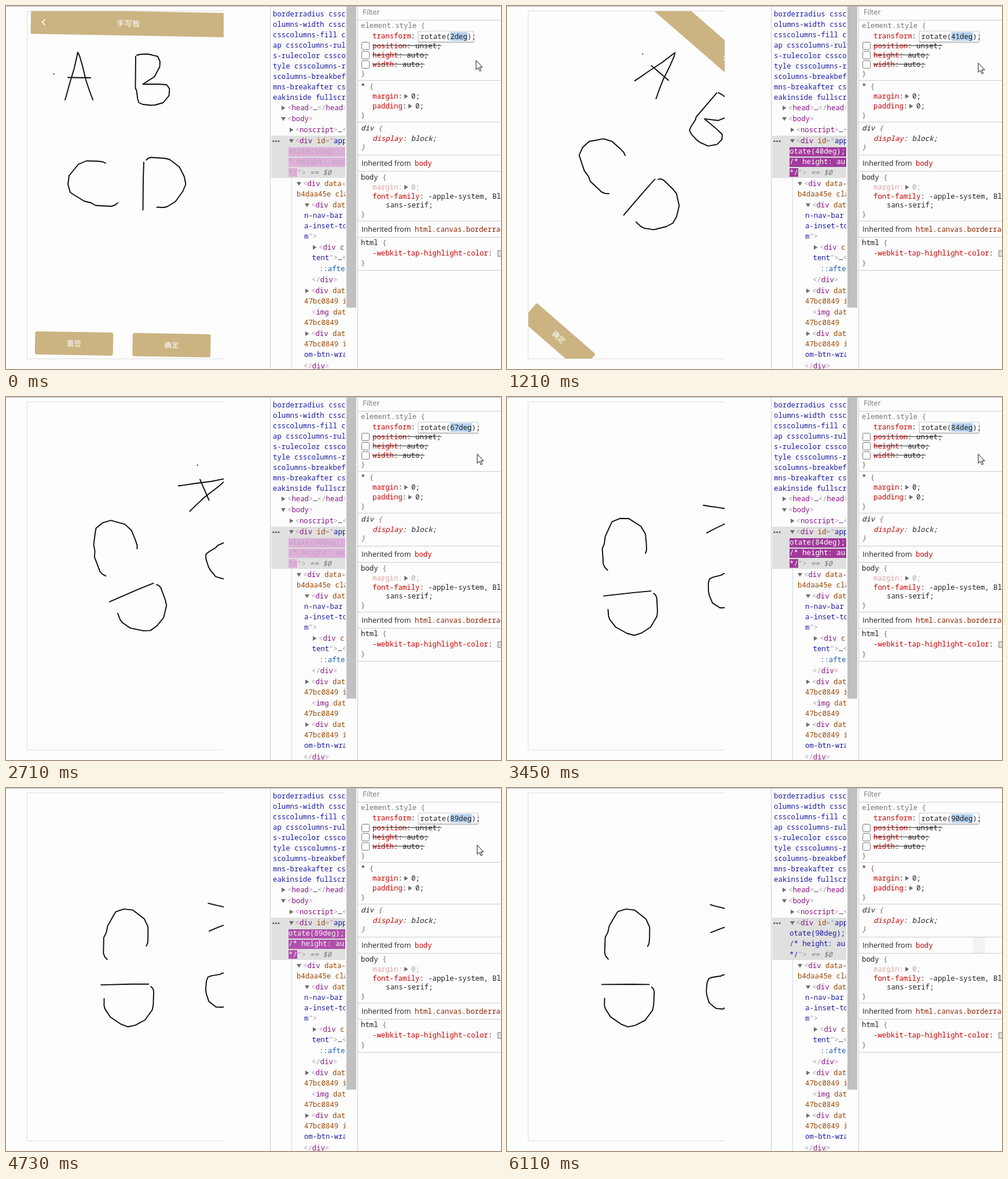
These frames come from a looping animation (855 by 627 pixels, 6210 ms). An HTML page:

```html
<!DOCTYPE html>
<html lang="zh-CN">
<head>
<meta charset="utf-8">
<title>Rotate</title>
<style>
html, body { margin: 0; width: 855px; height: 627px; overflow: hidden; background: #fdfdfd; }
svg { display: block; }
text { font: 12.33px "Noto Sans Mono", monospace; white-space: pre; }
.ui { font: 12.6px "Open Sans", sans-serif; }
.zh { font: 12.6px "Noto Sans CJK SC", "Noto Sans CJK", sans-serif; text-anchor: middle; fill: #fff; }
.it { font-style: italic; }
.k { fill: #a894a6; } .t { fill: #881280; } .a { fill: #994500; } .v { fill: #1a1aa6; }
.p { fill: #c80000; } .b { fill: #222; } .g { fill: #777; } .x { fill: #1a5fb4; }
.r { fill: #8b2500; } .c { fill: #8a6a55; } .f { fill: #e3a0a0; } .l { fill: #aaa; }
</style>
</head>
<body>
<svg id="stage" width="855" height="627" viewBox="0 0 855 627">
  <defs>
    <clipPath id="pageClip"><rect x="37" y="9" width="339" height="600"/></clipPath>
    <clipPath id="treeClip"><rect x="457" y="1" width="129" height="626"/></clipPath>
    <filter id="shadow" x="-10%" y="-30%" width="120%" height="180%">
      <feDropShadow dx="0" dy="1" stdDeviation="1.2" flood-opacity=".35"/>
    </filter>
  </defs>
  <path d="M376 8.5H36.5V609.5H376" fill="none" stroke="#dedede"/>
  <g clip-path="url(#pageClip)">
    <g id="app">
      <g fill="#cbb382">
        <rect x="38" y="9" width="337" height="42"/>
        <rect x="54.9" y="564.5" width="134.8" height="40" rx="3.5"/>
        <rect x="223.4" y="564.5" width="134.8" height="40" rx="3.5"/>
      </g>
      <path d="M62.6 25.5l-5 5 5 5" fill="none" stroke="#fff" stroke-width="1.7"/>
      <text class="zh" x="206.5" y="35" style="font-size:13.5px">手写板</text>
      <text class="zh" x="122.3" y="589">重签</text>
      <text class="zh" x="290.8" y="589">确定</text>
      <g transform="rotate(-1 206.5 308.6)" fill="none" stroke="#0a0a0a" stroke-width="1.9" stroke-linecap="round" stroke-linejoin="round">
        <path d="M82.5 117.5h.2"/>
        <path d="M102 162l3-10 4-15 9-30 4-18 2-9 3 6 5 17 6 25 6 18 6 16M107 123.5l39 .5"/>
        <path d="M224 87l-.5 55 2 4 2 15 2 6 7 3 14 1.500 7-.5 14-4 10-12 1-12-5-7-13-1h-28l20-13 9-17 .5-9-4-9-17-4-13 .5-6 1.500"/>
        <path d="M172 271.500l-5-2.500-10-1-18-.5-14 6-16 19.500-2 15 4 14 6 4 18 11 12 3 8 4.500 27 1.500 6-2 5-4"/>
        <path d="M238 270l-1 30-.5 52M242.500 266l3-3 5-1.500 23 1.500 9 2 17 13 8.500 17 2.500 13-5 12-13 18-14 8.500-6 1.500-12-.5"/>
      </g>
    </g>
  </g>
  <path d="M0 .5H855" stroke="#b8b8b8"/>
  <path d="M456.500 1V627M607.500 1V627" stroke="#cbcbcb"/>
  <rect x="588" y="1" width="17" height="520" fill="#c1c1c1"/>
  <g id="tree" clip-path="url(#treeClip)">
    <rect x="458" y="224" width="128" height="73" fill="#e0e0e0"/>
    <path d="M493.500 297V627" stroke="#d0d7ea"/>
    <g id="marks">
      <rect x="488" y="244" width="98" height="16"/>
      <rect x="488" y="262" width="98" height="16"/>
      <rect x="488" y="280" width="15" height="15"/>
    </g>
    <g fill="#555"><circle cx="462" cy="233.500" r="1.500"/><circle cx="466.500" cy="233.500" r="1.500"/><circle cx="471" cy="233.500" r="1.500"/></g>
  </g>
  <g id="styles">
    <path id="rules" fill="none" stroke="#cccccc"/>
    <rect id="patch" x="805" y="258" width="20" height="27" fill="#f2f2f2"/>
  </g>
  <g id="edit">
    <rect id="field" x="712.500" y="43.500" height="18" fill="#fff" stroke="#d4d4d4" filter="url(#shadow)"/>
    <rect id="pick" x="767.500" y="45" height="15" fill="#b3d2f0"/>
    <text id="value" class="b" x="715.500" y="56.500"></text>
  </g>
  <path id="cursor" d="M0 0V16l3.700-3.500 2.600 6 2.300-1-2.600-5.700h5z" fill="#fff" stroke="#111" stroke-linejoin="round"/>
</svg>
<script>
const LOOP = 6210;
const $ = id => document.getElementById(id);

function add(parent, name, attrs) {
  const el = document.createElementNS("http://www.w3.org/2000/svg", name);
  for (const key in attrs) el.setAttribute(key, attrs[key]);
  parent.append(el);
  return el;
}

// "~tdiv~adata" gives spans "div" and "data" with classes t and a
function line(parent, x, y, spec, cls = "") {
  const el = add(parent, "text", { x, y: y + 4.3, class: cls });
  for (const part of spec.split("~").slice(1))
    add(el, "tspan", { class: part[0] }).textContent = part.slice(1);
  return el;
}

function arrow(parent, x, y, open) {
  const d = open ? "m-4-3h8l-4 6.500z" : "m-3-4v8l6.500-4z";
  add(parent, "path", { d: `M${x} ${y}${d}`, fill: "#6e6e6e" });
}

const tree = $("tree"), styles = $("styles");

["borderradius cssc", "olumns-width cssc", "csscolumns-fill c", "ap csscolumns-rul",
 "s-rulecolor cssco", "tyle csscolumns-r", "scolumns-breakbef", "mns-breakafter cs", "eakinside fullscr"]
  .forEach((s, i) => line(tree, 461, 13.5 + i * 18, "~v" + s));

[[486, 176, "~k<~thead~k>~b…~k</~thead~k>"],
 [486, 195, "~k<~tbody~k>"],
 [499.5, 214, "~k<~tnoscript~k>~b…~k</"],
 [499.5, 233, "~k<~tdiv ~aid~k=\"~vapp"],
 [513, 307, "~k<~tdiv ~adata-"],
 [502, 325, "~ab4daa45e cla"],
 [527, 344, "~k<~tdiv ~adata"],
 [515, 362, "~vn-nav-bar v"],
 [515, 380, "~va-inset-top"],
 [515, 398, "~vm~k\">"],
 [540, 417, "~k<~tdiv ~ac"],
 [528.5, 435, "~vtent~k\">~b…~k</"],
 [541, 454, "~x::after"],
 [528, 473, "~k</~tdiv~k>"],
 [527, 492, "~k<~tdiv ~adata"],
 [515, 510, "~a47bc0849 id"],
 [528, 529, "~k<~timg ~adata"],
 [515, 547, "~a47bc0849 "],
 [527, 566, "~k<~tdiv ~adata"],
 [515, 584, "~a47bc0849 id"],
 [515, 602, "~vom-btn-wrap"],
 [514, 622, "~k</~tdiv~k>"]].forEach(row => line(tree, ...row));

[[479, 176], [479, 195, 1], [493, 214], [493, 233, 1], [506, 307, 1], [520, 344, 1],
 [533, 417], [520, 492], [520, 566]].forEach(a => arrow(tree, ...a));

const attr = [251, 269, 287.5].map(y => line(tree, 488, y, "~v*/").firstChild);
line(tree, 503, 287.5, "~k\">");
line(tree, 525, 287.5, "~g== $0", "it");

$("rules").setAttribute("d", [24, 128, 200, 257, 285, 371, 399, 456].map(y => `M608 ${y}.5H855`).join(""));

[[616, 10.5, "~gFilter", "ui"],
 [613, 34, "~gelement.style {"],
 [633, 52, "~ptransform~b:"],
 [633, 69, "~pposition~b: unset;"],
 [633, 85, "~pheight~b: auto;"],
 [633, 101, "~pwidth~b: auto;"],
 [613, 117, "~c}"],
 [613, 139, "~b* ~c{"],
 [633, 156, "~pmargin~b:"], [700, 156, "~b0;"],
 [633, 173, "~ppadding~b:"], [707, 173, "~b0;"],
 [613, 189, "~c}"],
 [613, 211, "~bdiv ~c{", "it"],
 [633, 229, "~pdisplay~b: block;", "it"],
 [613, 244, "~c}", "it"],
 [614, 271.5, "~bInherited from", "ui"], [706, 272, "~pbody"],
 [613, 296, "~bbody ~c{"],
 [633, 313, "~fmargin~l:"], [700, 313, "~l0;"],
 [633, 329, "~pfont-family~b: -apple-system, Bl"],
 [656, 344, "~bsans-serif;"],
 [613, 360, "~c}"],
 [614, 385.5, "~bInherited from", "ui"], [706, 386, "~rhtml.canvas.borderrad"],
 [613, 409, "~bhtml ~c{"],
 [633, 427, "~p-webkit-tap-highlight-color~b:"],
 [613, 444, "~c}"]].forEach(row => line(styles, ...row));

[[691, 156], [698, 173], [691, 313]].forEach(a => arrow(styles, ...a));
[[69, 752], [85, 730], [101, 723]].forEach(([y, end]) => {
  add(styles, "rect", { x: 614.5, y: y - 6.5, width: 13, height: 13, rx: 2, fill: "#fff", stroke: "#767676" });
  add(styles, "path", { d: `M633 ${y - .5}H${end}`, stroke: "#333" });
});
add(styles, "rect", { x: 849.5, y: 422.5, width: 10, height: 10, fill: "#ddd", stroke: "#888" });

// time, drawn angle, angle in the tree
const steps = [
  [0, 1, 1], [150, 3, 2], [270, 7, 6], [390, 12, 11], [540, 18, 17], [690, 24, 23], [810, 28, 27],
  [930, 32, 31], [1080, 37, 36], [1200, 41, 40], [1320, 45, 44], [1440, 50, 49], [1570, 55, 55],
  [1690, 57, 55], [1810, 60, 59], [1930, 64, 63], [2080, 65, 65], [2200, 66, 66], [2590, 67, 66],
  [2830, 71, 70], [2950, 76, 75], [3070, 80, 79], [3210, 82, 82], [3330, 83, 83], [3450, 84, 84],
  [3840, 85, 84], [3960, 85, 85], [4110, 86, 85], [4230, 87, 87], [4490, 88, 88], [4610, 89, 89],
  [4850, 90, 90]
];
const moves = [[0, 812, 94], [150, 814, 98.5], [5270, 794, 179], [5420, 789, 583], [5590, 789, 640]];

// age of a tree update, mark colour, text colour
const fade = [
  [0, [160, 58, 155], [255, 255, 255]],
  [130, [176, 82, 172], [252, 240, 252]],
  [510, [221, 176, 217], [194, 160, 194]],
  [1260, [224, 224, 224], [26, 26, 166]]
];

const lastIndex = (list, t) => list.findLastIndex(s => s[0] <= t);

function fadeAt(age, column) {
  const i = Math.min(lastIndex(fade, age), fade.length - 2);
  const [a, b] = [fade[i], fade[i + 1]];
  const p = Math.min(1, (age - a[0]) / (b[0] - a[0]));
  return `rgb(${a[column].map((v, n) => Math.round(v + (b[column][n] - v) * p))})`;
}

function draw(t) {
  const i = lastIndex(steps, t);
  const [, angle, shown] = steps[i];
  const since = steps.find(s => s[2] === shown)[0];
  const age = shown === 1 ? t + 510 : t - since;

  $("app").setAttribute("transform", `rotate(${angle} 206.5 308.6)`);

  const typed = `${i ? angle : 2}deg`;
  $("value").textContent = `rotate(${typed});`;
  $("pick").setAttribute("width", typed.length * 7.4);
  $("field").setAttribute("width", 65.5 + typed.length * 7.4);

  const short = shown < 10;
  attr[0].textContent = `otate(${shown}deg);` + (short ? "/" : "");
  attr[1].textContent = short ? "* height: aut" : "/* height: au";
  $("marks").setAttribute("fill", fadeAt(age, 1));
  attr.forEach(el => el.style.fill = fadeAt(age, 2));

  const [, x, y] = moves[lastIndex(moves, t)];
  $("cursor").setAttribute("transform", `translate(${x} ${y})`);
  $("patch").style.display = t < 5270 ? "none" : "";
}

const start = performance.now();
function tick() {
  draw((performance.now() - start) % LOOP);
  requestAnimationFrame(tick);
}
tick();
</script>
</body>
</html>
```
